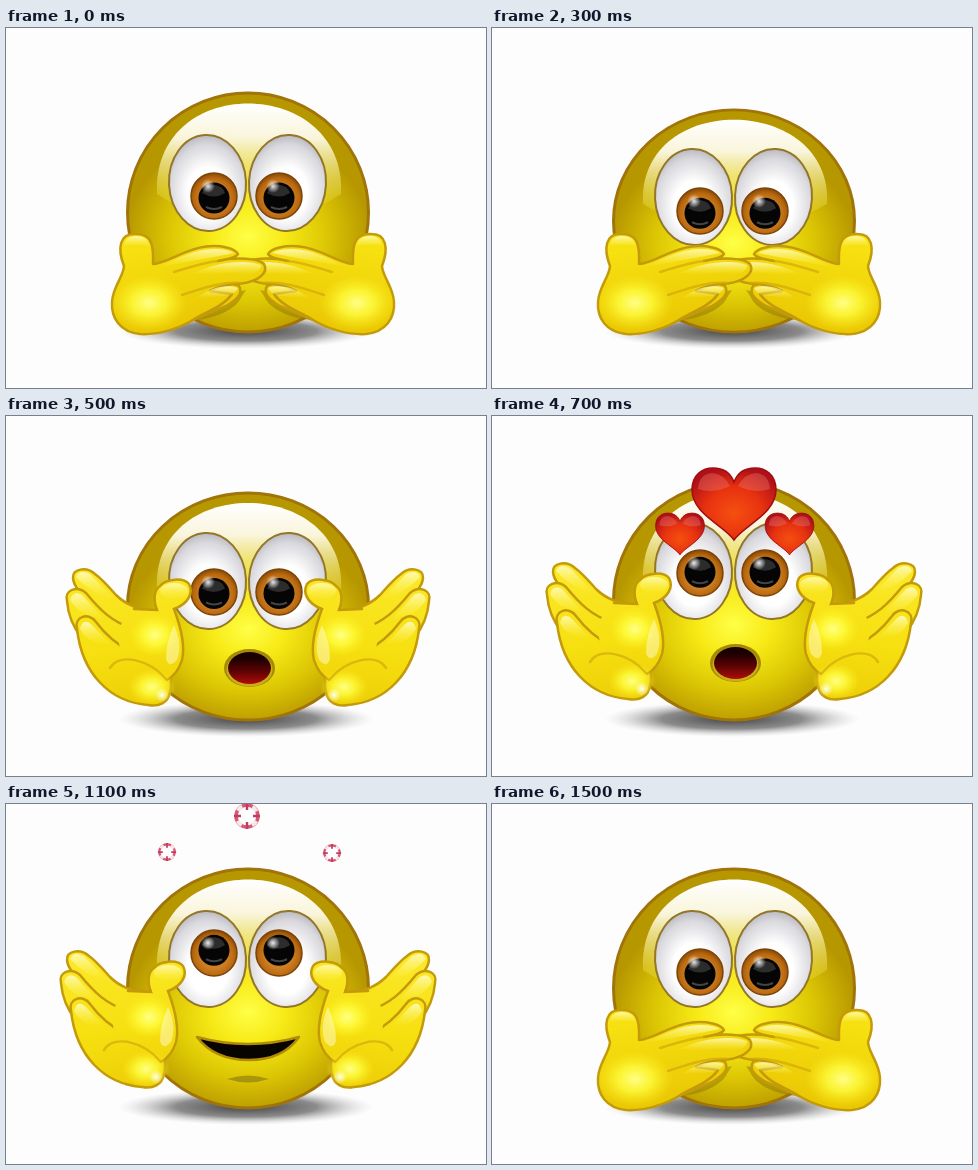
Animation, 480 px wide and 360 px high, one loop 1600 ms. Source, as an HTML page:

```html
<!DOCTYPE html>
<html lang="en">
<head>
<meta charset="utf-8">
<title>Blown kiss</title>
<style>
  html, body { margin: 0; width: 100%; height: 100%; overflow: hidden; background: #fdfdfd; }
  svg { display: block; width: 100vw; height: 100vh; }
  .skin { fill: url(#skin); stroke: #c39a0a; stroke-width: 2.5; stroke-linejoin: round; }
  .fill { fill: url(#skin); }
  .edge { fill: none; stroke: #c39a0a; stroke-width: 2.5; stroke-linecap: round; }
  .line { fill: none; stroke: #cfa60a; stroke-width: 2.5; stroke-linecap: round; opacity: .65; }
  .shine { fill: url(#shine); }
  .glow { fill: url(#glow); }
</style>
</head>
<body>
<svg viewBox="0 0 480 360">
  <defs>
    <radialGradient id="face" gradientUnits="userSpaceOnUse" cx="0" cy="0" r="122" gradientTransform="translate(242 208) scale(1 .84)">
      <stop offset="0" stop-color="#ffff48"/>
      <stop offset=".3" stop-color="#f7ea16"/>
      <stop offset=".65" stop-color="#dcc604"/>
      <stop offset="1" stop-color="#b79700"/>
    </radialGradient>
    <linearGradient id="gloss" x1="0" y1="0" x2="0" y2="1">
      <stop offset="0" stop-color="#fff"/>
      <stop offset=".3" stop-color="#fffdee" stop-opacity=".92"/>
      <stop offset="1" stop-color="#fff640" stop-opacity="0"/>
    </linearGradient>
    <radialGradient id="shadow">
      <stop offset="0" stop-color="#444"/>
      <stop offset=".55" stop-color="#777" stop-opacity=".85"/>
      <stop offset="1" stop-color="#ccc" stop-opacity="0"/>
    </radialGradient>
    <radialGradient id="white" cx=".5" cy=".6" r=".62">
      <stop offset=".42" stop-color="#fff"/>
      <stop offset=".8" stop-color="#d9d9de"/>
      <stop offset="1" stop-color="#b4b4bc"/>
    </radialGradient>
    <radialGradient id="iris" cx=".5" cy=".55" r=".55">
      <stop offset=".5" stop-color="#d08024"/>
      <stop offset=".8" stop-color="#b8680f"/>
      <stop offset="1" stop-color="#864806"/>
    </radialGradient>
    <radialGradient id="spark">
      <stop offset="0" stop-color="#fff" stop-opacity=".9"/>
      <stop offset="1" stop-color="#fff" stop-opacity="0"/>
    </radialGradient>
    <linearGradient id="skin" gradientUnits="userSpaceOnUse" x1="95" y1="150" x2="120" y2="305">
      <stop offset="0" stop-color="#fbe828"/>
      <stop offset=".5" stop-color="#f6e010"/>
      <stop offset="1" stop-color="#eac804"/>
    </linearGradient>
    <linearGradient id="shine" x1="0" y1="0" x2="0" y2="1">
      <stop offset="0" stop-color="#fffcc8" stop-opacity=".85"/>
      <stop offset="1" stop-color="#fff350" stop-opacity=".05"/>
    </linearGradient>
    <radialGradient id="glow">
      <stop offset="0" stop-color="#ffff88"/>
      <stop offset=".45" stop-color="#ffff40" stop-opacity=".75"/>
      <stop offset="1" stop-color="#fff020" stop-opacity="0"/>
    </radialGradient>
    <linearGradient id="throat" x1="0" y1="0" x2="0" y2="1">
      <stop offset=".2" stop-color="#1c0000"/>
      <stop offset=".6" stop-color="#5c0303"/>
      <stop offset="1" stop-color="#b00c0a"/>
    </linearGradient>
    <radialGradient id="love" cx=".5" cy=".62" r=".62">
      <stop offset="0" stop-color="#f4500f"/>
      <stop offset=".55" stop-color="#e83210"/>
      <stop offset="1" stop-color="#b01018"/>
    </radialGradient>

    <path id="heart" d="M0 36C-9 22-42 10-42-14C-42-30-31-36-21-36C-10-36-3-30 0-22C3-30 10-36 21-36C31-36 42-30 42-14C42 10 9 22 0 36Z"/>
    <ellipse id="eye" rx="38.5" ry="48" fill="url(#white)" stroke="#94762a" stroke-width="2"/>

    <g id="closed">
      <path d="M180 293C200 292 228 286 236 268L240 262L196 272Z" fill="#8f7a06" opacity=".5"/>
      <path class="skin" d="M185 270C205 256 222 252 233 258C238 266 229 273 220 278C206 284 196 288 182 294Z"/>
      <path class="skin" d="M118 238C111 220 114 206 128 206C144 205 148 214 147 236C162 235 178 221 200 218.5C215 217 229 220 232 226C230 230 221 231 212 233C230 229 252 230 258 236C263 245 252 253 236 255.5C226 256 212 258 204 263L226 266C218 278 200 284 190 290C172 302 150 307 134 306C114 304 105 290 106 274C107 258 117 250 118 238Z"/>
      <ellipse class="glow" cx="143" cy="275" rx="38" ry="28"/>
      <path class="shine" d="M153 239C172 230 190 221 208 221Q222 221 228 225C205 230 185 233 153 239Z"/>
      <path class="shine" d="M188 245C210 234 240 231 255 237Q256 243 246 246C225 244 207 247 188 245Z"/>
      <path class="shine" d="M190 270C207 258 222 256 232 260Q230 266 220 268Z"/>
      <path class="shine" d="M118 218Q118 209 129 208Q143 208 144 219Q130 214 118 218Z"/>
      <path class="line" d="M212 233C195 235 182 240 168 244M236 255C215 253 195 261 176 267"/>
    </g>

    <g id="open">
      <path class="skin" d="M142 190C128 187 115 184 104 173C96 164 90 157 83 152C74 144 60 147 61 156C62 166 70 172 80 180L104 225L145 220Z"/>
      <path class="skin" d="M55 179C52 168 65 163 74 171C88 188 100 200 120 206L108 240C75 232 57 205 55 179Z"/>
      <path class="skin" d="M65 207C62 194 77 190 84 200C93 212 104 222 118 229L152 236C159 246 160 262 158 270C156 281 147 285 136 283C98 280 70 252 65 207Z"/>
      <path class="fill" d="M120 188C130 186 140 190 146 187C141 178 142 168 148 164C154 157 171 155 177 162C182 171 176 182 162 187C168 203 174 222 170 238C166 250 160 256 154 258C135 250 115 240 108 226C104 212 108 198 120 188Z"/>
      <path class="edge" d="M122 187L145 188C141 178 142 168 148 164C154 157 171 155 177 162C182 171 176 182 162 187C168 203 174 222 170 238C167 248 162 254 155 258"/>
      <ellipse class="glow" cx="143" cy="213" rx="26" ry="22"/>
      <ellipse class="glow" cx="140" cy="265" rx="24" ry="18"/>
      <path d="M162 203Q171 222 165 238Q157 247 154 237Q154 220 162 203Z" fill="#fffcd0" opacity=".5"/>
      <ellipse cx="150" cy="273" rx="7" ry="7" fill="url(#spark)"/>
      <ellipse class="shine" cx="162" cy="169" rx="14" ry="8"/>
      <path class="shine" d="M64 155Q67 147 78 152L102 177Q82 174 64 155Z"/>
      <path class="shine" d="M58 178Q61 168 70 173L92 197Q67 194 58 178Z"/>
      <path class="shine" d="M68 207Q71 195 80 203L98 222Q76 223 68 207Z"/>
      <path class="line" d="M98 246C108 230 138 238 154 257"/>
    </g>
  </defs>

  <rect width="480" height="360" fill="#fdfdfd"/>
  <ellipse cx="240" cy="303" rx="128" ry="18" fill="url(#shadow)"/>
  <g id="head">
    <ellipse cx="242" cy="184.5" rx="120.5" ry="119.5" fill="url(#face)" stroke="#a1740a" stroke-width="3"/>
    <path d="M151 166C148 108 192 75.500 242 75.500C292 75.500 338 108 335 166Q300 190 242 190Q185 190 151 166Z" fill="url(#gloss)"/>
  </g>
  <g id="eyes">
    <use href="#eye" transform="translate(201.500 155) rotate(-3)"/>
    <use href="#eye" transform="translate(281.500 155) rotate(3)"/>
  </g>
  <g id="pupils"></g>
  <g id="gasp">
    <ellipse cx="243.5" rx="25.500" ry="19" fill="#a58a08"/>
    <ellipse cx="243.5" cy="1.500" rx="23" ry="17" fill="#c9ae14"/>
    <ellipse cx="243.5" rx="21.500" ry="16" fill="url(#throat)"/>
  </g>
  <g id="smile">
    <path d="M191 233Q242 247 293 233Q277 256 243 256Q208 256 191 233Z" fill="#080400" stroke="#b18c06" stroke-width="2.5" stroke-linejoin="round"/>
    <path d="M221 275Q242 268 263 275Q242 282 221 275Z" fill="#8f7c12" opacity=".65"/>
  </g>
  <g id="palms">
    <use id="rightPalm" href="#open"/>
    <use id="leftPalm" href="#open"/>
  </g>
  <g id="cover">
    <use href="#closed" transform="translate(494 0) scale(-1 1)"/>
    <use href="#closed"/>
  </g>
  <g id="hearts"></g>
</svg>
<script>
const STEP = 100, COUNT = 16;
const $ = id => document.getElementById(id);

// time step, head top, eye shift, pupil y, mouth (0 hidden, 1 gasp, 2 smile), mouth y, hand pull-in
const poses = [
  [0, 64, 0, 168, 0, 0, 0],
  [1, 70, 5, 173, 0, 0, 0],
  [2, 75, 10, 178, 0, 0, 0],
  [3, 81, 14, 183, 0, 0, 0],
  [4, 82, 15, 185, 1, 255, 11],
  [5, 76, 10, 176, 1, 252, 6],
  [6, 70, 5, 166, 1, 249, 0],
  [7, 65, 0, 157, 1, 247, 0],
  [8, 64, 0, 149, 2, 0, 0],
  [13, 64, 0, 156, 2, 0, 0],
  [14, 64, 0, 163, 1, 247, 11],
  [15, 64, 0, 168, 0, 0, 0]
];

// start x, start y, end x, end y, size
const flights = [
  [242, 88, 241, 12, 1],
  [188, 118, 161, 48, .58],
  [297.5, 118, 326, 49, .58]
];

// time step: [flight progress, scale, look]
const heartSteps = {
  6: [-.25, .55, "full"],
  7: [0, 1, "full"],
  8: [.55, .95, "full"],
  9: [1, .8, "fading"],
  10: [1, .55, "fading"],
  11: [1, 1, "ring"],
  12: [1, .85, "ring"]
};

const cross = (r, w, color) =>
  `<path d="M0 ${-r}V${r}M${-r} 0H${r}" stroke="${color}" stroke-width="${w}"/>`;

const looks = {
  full: () => `<use href="#heart" fill="url(#love)" stroke="#a00d10" stroke-width="1.5"/>
    <path d="M-36-15Q-35-30-22-31Q-10-30-4-18Q-20-10-36-15ZM36-15Q35-30 22-31Q10-30 4-18Q20-10 36-15Z" fill="#f0807a" opacity=".35"/>`,
  fading: () => `<use href="#heart" fill="#f07a84" stroke="#c04050" stroke-width="3" opacity=".45"/>
    <use href="#heart" transform="scale(.68)" fill="#e05a5a" opacity=".4"/>
    ${cross(24, 13, "#fff1ee")}${cross(22, 7, "#e0605c")}`,
  ring: () => `<circle r="11" fill="#fff" stroke="#d25a78" stroke-width="3.5"/>
    <circle r="10.5" fill="none" stroke="#fbe6ea" stroke-width="4" stroke-dasharray="6 10.5" transform="rotate(29)"/>
    <path d="M0-13V-6M0 13V6M-13 0H-6M13 0H6" stroke="#c43c5c" stroke-width="2.5"/>`
};

function drawHearts(step) {
  const state = heartSteps[step];
  if (!state) return "";
  const [p, scale, look] = state;
  return flights.map(([x0, y0, x1, y1, size]) => {
    const x = x0 + (x1 - x0) * p, y = y0 + (y1 - y0) * p;
    const s = scale * (look === "ring" && size < 1 ? .7 : size);
    return `<g transform="translate(${x} ${y}) scale(${s})">${looks[look]()}</g>`;
  }).join("");
}

// The black centre leans the way the eye looks.
function drawPupil(x, y, gaze) {
  return `<g transform="translate(${x} ${y})">
    <circle r="23" fill="url(#iris)" stroke="#7d4408" stroke-width="1.5"/>
    <g transform="translate(0 ${gaze})">
      <circle r="15.5" fill="#050505"/>
      <path d="M-12-5Q-8-13 1-13Q9-12 11-5Q0 2-12-5Z" fill="#888" opacity=".3"/>
      <path d="M-8 9Q0 13 8 9" fill="none" stroke="#444" stroke-width="2"/>
    </g>
    <circle cx="-6" cy="-10" r="7" fill="url(#spark)"/>
  </g>`;
}

const show = (id, on) => $(id).setAttribute("display", on ? "inline" : "none");
const place = (id, value) => $(id).setAttribute("transform", value);

function draw(step) {
  const [, top, eyeY, pupilY, mouth, mouthY, pull] = poses.filter(p => p[0] <= step).pop();
  const squash = (305 - top) / 241;
  const gaze = (pupilY - eyeY - 160) / 4;
  place("head", `translate(0 ${305 * (1 - squash)}) scale(1 ${squash})`);
  place("eyes", `translate(0 ${eyeY})`);
  place("gasp", `translate(0 ${mouthY})`);
  place("leftPalm", `translate(${pull} ${pull})`);
  place("rightPalm", `translate(${484 - pull} ${pull}) scale(-1 1)`);
  show("gasp", mouth === 1);
  show("smile", mouth === 2);
  show("palms", mouth > 0);
  show("cover", mouth === 0);
  $("pupils").innerHTML = drawPupil(208, pupilY, gaze) + drawPupil(273, pupilY, gaze);
  $("hearts").innerHTML = drawHearts(step);
}

const start = performance.now();
let last = -1;
function tick(now) {
  const step = Math.floor(Math.max(0, now - start) / STEP) % COUNT;
  if (step !== last) draw(last = step);
  requestAnimationFrame(tick);
}
draw(0);
requestAnimationFrame(tick);
</script>
</body>
</html>
```
